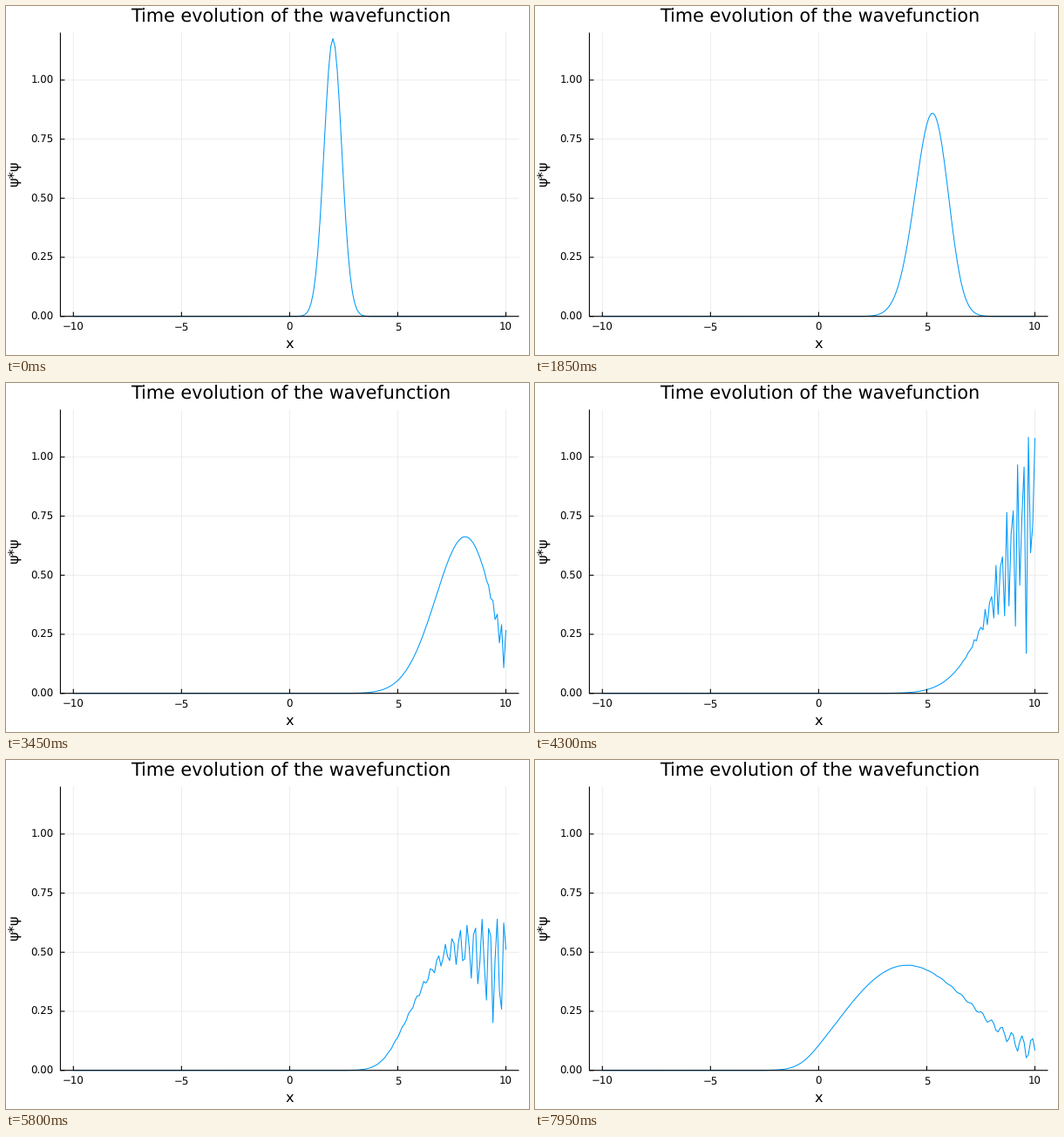
Write a matplotlib script that moves like this. It is 600x400 px and loops after 8 s.

```python
import numpy as np
import matplotlib.pyplot as plt
from matplotlib.animation import FuncAnimation

W, H, DPI = 600, 400, 100
FRAMES, INTERVAL = 160, 50
PX = 72 / DPI                      # points per pixel
plt.rcParams["font.family"] = "DejaVu Sans"
plt.rcParams["text.hinting"] = "none"

# Plot area in pixels
LEFT, RIGHT, TOP, BASE = 62.4, 588.5, 30.5, 355.7
X_ZERO, X_UNIT, Y_UNIT = 325.4, 24.81, 270.8

# Wave packet on a grid whose walls lie one step outside it
N = 201
START, WAVENUMBER = 2.0, 20.0
HALF_STEP = 0.453                  # hbar * dt / (2 m dx^2)
STEPS = 1.5                        # time steps per frame

x = np.linspace(-10, 10, N)
psi0 = (6 / np.pi) ** 0.25 * np.exp(-3 * (x - START) ** 2 + 1j * WAVENUMBER * x)

# Standing waves between the walls, phases by the Crank-Nicolson rule
n = np.arange(1, N + 1)
modes = np.sqrt(2 / (N + 1)) * np.sin(np.pi * np.outer(n, n) / (N + 1))
energy = 1 - np.cos(np.pi * n / (N + 1))
omega = 2 * STEPS * np.arctan(HALF_STEP * energy)
weights = modes @ psi0


def amplitude(frame):
    return np.abs(modes @ (weights * np.exp(-1j * omega * frame)))


def to_px(v):
    return X_ZERO + X_UNIT * v


def to_py(v):
    return BASE - Y_UNIT * v


fig = plt.figure(figsize=(W / DPI, H / DPI), dpi=DPI, facecolor="white")
ax = fig.add_axes([0, 0, 1, 1])
ax.set_xlim(0, W)
ax.set_ylim(H, 0)
ax.axis("off")


def rule(x0, y0, x1, y1, color="black", width=1.1, z=4):
    ax.plot([x0, x1], [y0, y1], color=color, lw=width * PX, zorder=z,
            solid_capstyle="butt", snap=False)


def label(px, py, text, size, **kw):
    ax.text(px, py, text, fontsize=size * PX, color="black", **kw)


GRID = dict(color="#e9e9e9", width=0.8, z=1)
for v in (-10, -5, 0, 5, 10):
    rule(to_px(v), TOP, to_px(v), BASE, **GRID)
    rule(to_px(v), BASE, to_px(v), BASE - 5)
    label(to_px(v), 371.7, str(v).replace("-", "\u2212"), 11.8, ha="center")
for v in (0, 0.25, 0.5, 0.75, 1):
    rule(LEFT, to_py(v), RIGHT, to_py(v), **GRID)
    rule(LEFT, to_py(v), LEFT + 5, to_py(v))
    label(54.6, to_py(v) + 4.3, f"{v:.2f}", 11.8, ha="right")
rule(LEFT, TOP, LEFT, BASE + 0.5)
rule(LEFT, BASE, RIGHT, BASE)

label(326.2, 18.6, "Time evolution of the wavefunction", 20.75, ha="center")
label(325.4, 391.6, "x", 16.3, ha="center")
label(18.3, 192.6, "ψ*ψ", 16.3, rotation=90, ha="right", va="center")

curve, = ax.plot(to_px(x), to_py(amplitude(0)), color="#009afa",
                 lw=1.05 * PX, zorder=3, solid_joinstyle="round")


def update(i):
    curve.set_ydata(to_py(amplitude(i)))
    return curve,


anim = FuncAnimation(fig, update, frames=FRAMES, interval=INTERVAL,
                     repeat=True, repeat_delay=0, blit=False)
plt.show()
```
